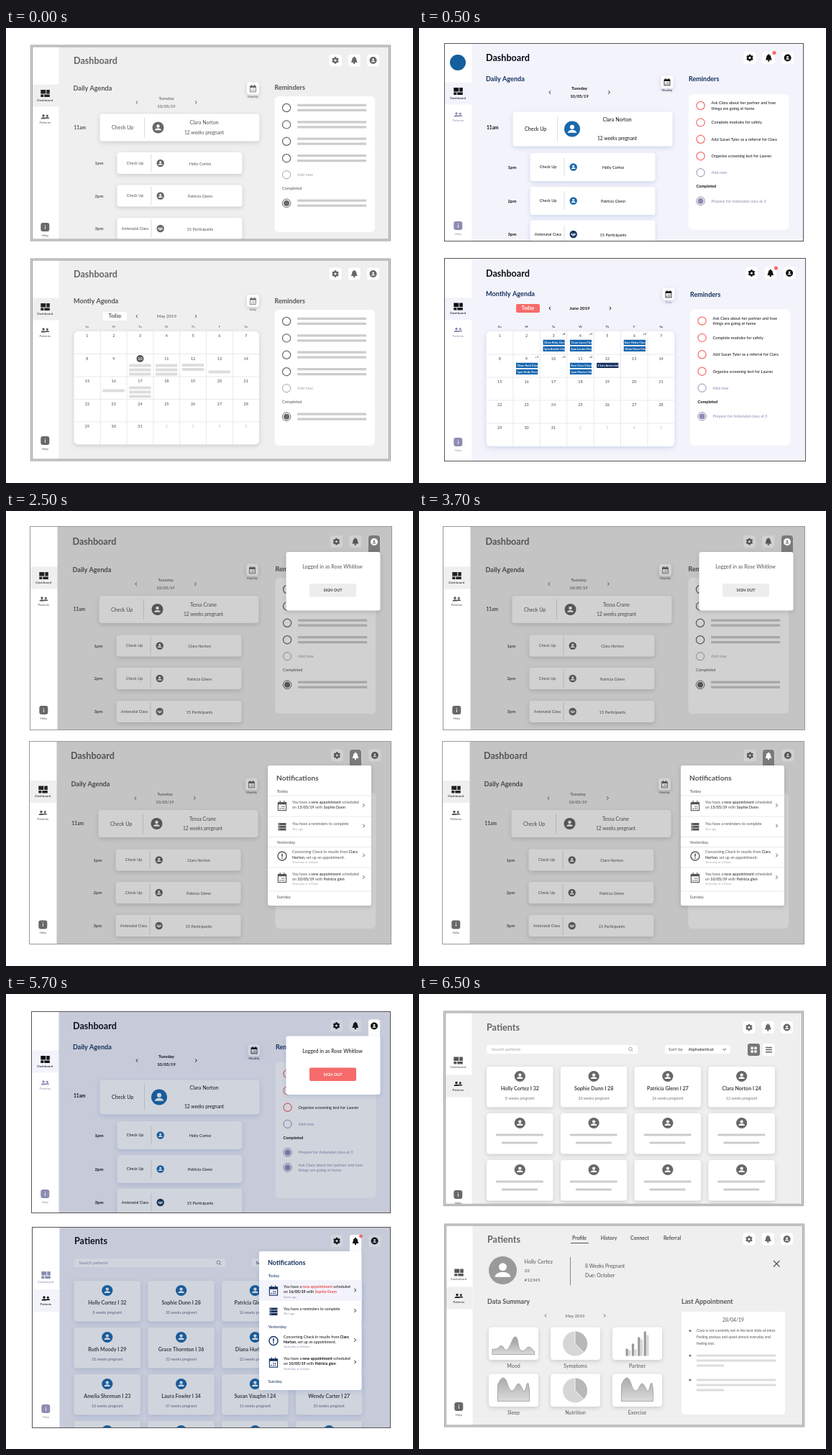
Recreate the animation shown at these times as an HTML page with a canvas. Size 566 by 633 pixels, loop 8 s.

```html
<!DOCTYPE html>
<html lang="en">
<head>
<meta charset="utf-8">
<title>Antenatal dashboard</title>
<style>
html, body { margin: 0; width: 100%; height: 100%; overflow: hidden; background: #fff; }
canvas { display: block; }
</style>
</head>
<body>
<canvas id="stage" width="566" height="633"></canvas>
<script>
const c = document.getElementById('stage').getContext('2d');

const wire = { bg: '#efefef', ink: '#555', head: '#666', title: '#555', dim: '#a5a5a5', mark: '#686868', group: '#686868',
  ring: '#666', icon: '#686868', on: '#222', off: '#555', help: '#686868', edge: '#999', shadow: 'rgba(0,0,0,.15)',
  veil: 'rgba(0,0,0,.18)', tab: '#7a7a7a', tabIcon: '#fff', button: '#ededed', buttonText: '#444', hot: '#333', list: '#555' };
const tint = { bg: '#f3f3fb', ink: '#111', head: '#0b0b14', title: '#15315f', dim: '#8c8cb2', mark: '#1a69ad', group: '#15315f',
  ring: '#f66b6b', icon: '#111', on: '#0b0b14', off: '#8c8cb2', help: '#8c8cb2', edge: '#555', shadow: 'rgba(70,110,190,.22)',
  veil: 'rgba(20,40,80,.2)', tab: '#fff', tabIcon: '#111', button: '#f66b6b', buttonText: '#fff', hot: '#f0504f', list: '#15315f' };
let th = wire;

// ---- primitives
function box(x, y, w, h, fill = '#fff', r = 0, shadow = false) {
  c.save();
  if (shadow) { c.shadowColor = th.shadow; c.shadowBlur = 6; c.shadowOffsetY = 2; }
  c.fillStyle = fill;
  c.beginPath(); c.roundRect(x, y, w, h, r); c.fill();
  c.restore();
}
function line(points, col, w = 1) {
  c.strokeStyle = col; c.lineWidth = w;
  c.beginPath(); points.forEach(p => c.lineTo(p[0], p[1])); c.stroke();
}
function dot(x, y, r, fill) { c.fillStyle = fill; c.beginPath(); c.arc(x, y, r, 0, 7); c.fill(); }
function ring(x, y, r, col, w = 1) { c.strokeStyle = col; c.lineWidth = w; c.beginPath(); c.arc(x, y, r, 0, 7); c.stroke(); }
// y is the middle of the capitals
function text(s, x, y, size, col = th.ink, bold = 0, align = 'left') {
  c.font = `${bold ? 700 : 400} ${size}px Lato, "Open Sans", sans-serif`;
  c.fillStyle = col; c.textAlign = align;
  c.fillText(s, x, y + size * .36);
}
const mid = (s, x, y, size, col, bold) => text(s, x, y, size, col, bold, 'center');
// parts between asterisks are bold, between tildes bold and highlighted
function rich(s, x, y, size) {
  s.split(/([*~][^*~]+[*~])/).forEach(part => {
    const bold = /^[*~]/.test(part), str = bold ? part.slice(1, -1) : part;
    text(str, x, y, size, part[0] === '~' ? th.hot : th.ink, bold);
    x += c.measureText(str).width;
  });
}
const chevron = (x, y, dir, s = 2.2, col = th.ink) => line([[x - dir * s / 2, y - s], [x + dir * s / 2, y], [x - dir * s / 2, y + s]], col);

// ---- icons
function person(x, y, r, col) {
  dot(x, y - r * .45, r * .5, col);
  c.beginPath(); c.ellipse(x, y + r * .85, r, r * .65, 0, Math.PI, 0); c.fill();
}
function avatar(x, y, r, col = th.mark) { dot(x, y, r, col); person(x, y, r * .56, '#fff'); }
function crowd(x, y, r, col) {
  dot(x, y, r, col);
  for (const dx of [-2.2, 2.2]) person(x + dx, y - .3, 1.5, '#fff');
  person(x, y + .6, 1.9, '#fff');
}
function gear(x, y, col) {
  for (let i = 0; i < 3; i++) {
    const a = i * Math.PI / 3 + Math.PI / 6, u = Math.cos(a) * 4.8, v = Math.sin(a) * 4.8;
    line([[x - u, y - v], [x + u, y + v]], col, 2.4);
  }
  ring(x, y, 2.6, col, 2.2); dot(x, y, 1.5, '#fff');
}
function bell(x, y, col) {
  dot(x, y - 1.2, 3, col);
  c.beginPath(); c.moveTo(x - 3, y - 1); c.lineTo(x - 4.3, y + 3); c.lineTo(x + 4.3, y + 3); c.lineTo(x + 3, y - 1); c.fill();
  dot(x, y - 4.2, 1, col); dot(x, y + 4, 1.2, col);
}
function calIcon(x, y, s, col) {
  c.strokeStyle = col; c.lineWidth = s * .2;
  c.strokeRect(x - s, y - s * .9, s * 2, s * 2);
  box(x - s, y - s, s * 2, s * .6, col);
  for (const dx of [-.5, .5]) box(x + dx * s - .5, y - s * 1.4, 1, s * .5, col);
  for (const [u, v] of [[.45, 0], [0, 0], [-.5, .5], [0, .5], [.45, .5]]) box(x + u * s - s * .12, y + v * s, s * .25, s * .25, col);
}
const headIcon = [gear, bell, (x, y, col) => { dot(x, y, 5, col); person(x, y, 2.6, col === '#fff' ? '#777' : '#fff'); }];

// ---- page parts
function screen(x, y, w, h, double, [dashY, helpY, active], body) {
  const cx = x + 18.8, patY = dashY + 32.5, tone = i => i === active ? th.on : th.off;
  c.save();
  c.beginPath(); c.rect(x, y, w, h); c.clip();
  box(x, y, w, h, th.bg);
  box(x, y, 38, h);
  box(x, (active ? patY : dashY) - 12.5, 38, 31, th.bg);
  for (const [u, v, a, b] of [[-6, -5, 7, 5.5], [2, -5, 4.5, 5.5], [-6, 1.5, 4, 3.5], [-1, 1.5, 7.5, 3.5]])
    box(cx + u, dashY + v, a, b, tone(0));
  mid('Dashboard', cx, dashY + 9.2, 4.6, tone(0));
  person(cx - 2.3, patY, 3.4, tone(1)); person(cx + 3, patY, 2.9, tone(1));
  mid('Patients', cx, patY + 8.2, 4.4, tone(1));
  box(cx - 6, helpY - 6, 12, 12, th.help, 3);
  mid('i', cx, helpY, 7, '#fff', 1);
  mid('Help', cx, helpY + 11, 4.4, th.off);
  body();
  c.restore();
  c.strokeStyle = th.edge; c.lineWidth = double ? 3 : 1;
  c.strokeRect(x, y, w, h);
  if (double) { c.strokeStyle = '#e6e6e6'; c.lineWidth = 1; c.strokeRect(x, y, w, h); }
}
function header(title, x, y, iconX, alert) {
  text(title, x, y, 12.6, th.head, 1);
  headIcon.forEach((draw, i) => {
    const ix = iconX + i * 26.3;
    box(ix - 8.5, y - 8.5, 17, 17, '#fff', 4);
    draw(ix, y, th.icon);
  });
  if (alert) dot(iconX + 34, y - 7, 2.6, '#f66b6b');
}
const veil = x => box(x, 0, 566, 633, th.veil);
function tab(i, x, y) {
  box(x - 8, y - 9, 16, 26, th.tab, [4, 4, 0, 0]);
  headIcon[i](x, y, th.tabIcon);
}
function calButton(x, y, label) {
  box(x - 8.5, y - 8.5, 17, 17, '#fff', 4, true);
  calIcon(x, y + .5, 4, th.icon);
  mid(label, x, y + 12, 4, th === tint && label === 'Daily' ? th.dim : th.ink);
}

const wireDay = { title: 84, cal: 84, date: 98, big: 138.5, bigH: 38, r: 8, gap: 7, rows: [188, 233.5, 279], rowH: 30 };
const wireDay2 = { ...wireDay, title: 82, cal: 82, date: 96, big: 137, rows: [187.5, 233, 279] };
const tintDay = { title: 71, cal: 75, date: 84, big: 140.5, bigH: 48, r: 11, gap: 13, rows: [193.5, 240.5, 287], rowH: 39 };
function daily(p, names, x = 93.5) {
  const bold = th === tint;
  text('Daily Agenda', x, p.title, 9.1, th.title, 1);
  calButton(bold ? 345 : 343.5, p.cal, 'Monthly');
  mid('Tuesday', 223, p.date, 6.1, th.ink, bold);
  mid('10/05/19', 223, p.date + 10.5, 5.8, th.ink, bold);
  chevron(182, p.date + 5.5, -1); chevron(264.3, p.date + 5.5, 1);
  text('11am', x + 1, p.big - (bold ? 2 : 0), 6.6, th.ink, 1);
  box(130.5, p.big - p.bigH / 2, 222, p.bigH, '#fff', 4, true);
  text('Check Up', 147, p.big, 7.1);
  box(192, p.big - p.bigH * .37, 1, p.bigH * .74, '#ddd');
  avatar(bold ? 213 : 211.5, p.big, p.r);
  mid(names[0], 275.5, p.big - p.gap, 7.1);
  mid('12 weeks pregnant', 275.5, p.big + p.gap, 6.6);
  p.rows.forEach((y, i) => {
    text(i + 1 + 'pm', 123.5, y, 6, th.ink, 1);
    box(154.5, y - p.rowH / 2, 174, p.rowH, '#fff', 4, true);
    mid(i < 2 ? 'Check Up' : 'Antenatal Class', 179.5, y, 5.5);
    box(201.5, y - 13, 1, 26, '#ddd');
    i < 2 ? avatar(214.7, y, 5.2) : crowd(214.7, y, 5.2, th.group);
    mid(names[i + 1] || '15 Participants', 270, y + .5, 5.6);
  });
}

const ask = ['Ask Clara about her partner and how', 'things are going at home'];
const screening = ['Organise screening test for Lauren'], prepare = ['Prepare for Antenatal class at 3'];
const todo = [ask, ['Complete modules for safety'], ['Add Susan Tyler as a referral for Clara'], screening];
const blank = [0, 0, 0, 0];
function reminders(x, y, items = blank, done = [0]) {
  const plain = th === wire, cx = x + 16.6, tx = x + 31.6;
  text('Reminders', x, y - (plain ? 12.7 : 21), 9, th.title, 1);
  box(x, y, 139.5, 189, '#fff', 6);
  const entry = (lines, cy, col) => {
    if (!lines) for (const dy of [-5.2, 1.8]) box(tx, cy + dy, 96, 3.2, '#ccc');
    else lines.forEach((s, i) => text(s, tx, cy + (i - (lines.length - 1) / 2) * 7.5, 5.55, col));
  };
  items.forEach((it, i) => {
    const cy = y + 16 + i * 23.4;
    ring(cx, cy, 5.6, th.ring, 1.2);
    entry(it, cy, th.ink);
  });
  const addY = y + 16 + items.length * 23.3;
  ring(cx, addY, 5.6, th.dim);
  text('Add new', tx, addY, 5.6, th.dim);
  text('Completed', x + 10.5, addY + 19, 5.7, th.ink, !plain);
  done.forEach((it, i) => {
    const cy = addY + 39.5 + i * 21, col = plain ? th.mark : th.dim;
    ring(cx, cy, 5.8, col); dot(cx, cy, 4, col);
    entry(it, cy, th.dim);
  });
}

function month(x, y, cw, ch, decorate) {
  ['Su', 'M', 'Tu', 'W', 'Th', 'F', 'Sa'].forEach((d, i) => mid(d, x + (i + .5) * cw, y - 7, 4.3));
  box(x, y, cw * 7, ch * 5, '#fff', 6, true);
  for (let i = 1; i < 7; i++) box(x + i * cw - .5, y, 1, ch * 5, '#e9e9ee');
  for (let i = 1; i < 5; i++) box(x, y + i * ch - .5, cw * 7, 1, '#e9e9ee');
  const at = day => [x + (day - 1) % 7 * cw, y + Math.floor((day - 1) / 7) * ch];
  for (let day = 1; day < 36; day++) {
    const [u, v] = at(day), now = th === wire && day === 10;
    if (now) dot(u + cw / 2, v + 6.5, 5, '#555');
    mid(day < 32 ? day : day - 30, u + cw / 2, v + 6.5, 5.4, now ? '#fff' : day < 32 ? '#444' : '#bbb', now);
  }
  decorate(at);
}
function monthBar(y, label, next) {
  box(135, y - 6, 33, 12, th === wire ? '#fff' : th.button, 2);
  mid('Today', 151.5, y, 6.6, th === wire ? th.ink : '#fff', 1);
  chevron(182, y, -1); chevron(next, y, 1);
  mid(label, 223.5, y, 6.1, th.ink, th === tint);
}

function account(x, y) {
  box(x, y, 131, 81.5, '#fff', 3, true);
  mid('Logged in as Rose Whitlow', x + 64.5, y + 20.5, 7.1);
  box(x + 32.5, y + 44, 65, 18.5, th.button, 2);
  mid('SIGN OUT', x + 65, y + 53.5, 5.5, th.buttonText, 1);
}
function notifications(x, y, w, top, h) {
  const plain = th === wire;
  box(x, top, w, h, '#fff', 3, true);
  text('Notifications', x + 12, y + 16, plain ? 10.2 : 9.1, th.title, 1);
  const days = [['Today', 34], ['Yesterday', 105], ['Sunday', 181]];
  days.forEach(([s, dy]) => text(s, x + 12.5, y + dy, 6, th.title));
  if (plain) [40, 69, 97.5, 111.5, 140, 173].forEach(dy => box(x, y + dy, w, 1, '#e9e9e9'));
  else box(x, y + 40, w, 29, th.bg);
  const q = plain ? '*' : '~';
  [[49.5, 'date', [`You have a ${q}new appointment${q} scheduled`, `on *${plain ? 15 : 16}/05/19* with ${q}Sophie Dunn${q}`], plain ? '' : '2mins ago'],
   [80, 'list', ['You have a reminders to complete'], '3hrs ago'],
   [119, 'alert', ['Concerning Check In results from *Clara*', '*Norton*, set up an appointment.'], 'Yesterday at 4:45pm'],
   [149.5, 'date', ['You have a *new appointment* scheduled', 'on *10/05/19* with *Patricia glen*'], 'Yesterday at 2:25pm'],
  ].forEach(([dy, kind, lines, note]) => {
    const iy = y + dy + (kind === 'list' ? 3.5 : 5.5), ix = x + 20;
    if (kind === 'date') calIcon(ix, iy, 5.6, th.list);
    if (kind === 'list') for (const k of [-5, -1.3, 2.4]) { box(ix - 5.5, iy + k, 11, 3, th.list); box(ix - 4.5, iy + k + 1, 1, 1); }
    if (kind === 'alert') { ring(ix, iy, 6, th.list, 1.4); box(ix - .8, iy - 3.5, 1.6, 4.5, th.list); box(ix - .8, iy + 2, 1.6, 1.6, th.list); }
    lines.forEach((s, i) => rich(s, x + 34, y + dy + i * (plain ? 7.3 : 6.7), 5.3));
    text(note, x + 34, y + dy + lines.length * 6.8, 4, th.dim);
    chevron(x + 133.5, iy - 1, 1, 2.3);
  });
}

function search(x, y, w) {
  box(x, y - 6, w, 12, '#fff', 3);
  text('Search patients', x + 7, y, 6, th.dim);
  ring(x + w - 10, y - .5, 2.3, th.dim); line([[x + w - 8.4, y + 1.2], [x + w - 6.5, y + 3]], th.dim);
}
function patient(x, y, name, weeks) {
  box(x, y, 92.5, 56.5, '#fff', 4, true);
  avatar(x + 46.3, y + 13.5, 7.6);
  if (name) {
    mid(name, x + 46.3, y + 30, 7.1, '#444', 1);
    mid(weeks + ' weeks pregnant', x + 46.3, y + 44, 5.2, th === tint ? '#666c88' : '#777');
  } else {
    box(x + 13, y + 28.5, 66, 3, '#ccc', 1);
    box(x + 21, y + 39.5, 50, 3, '#ccc', 1);
  }
}
const firstRow = [['Holly Cortez I 32', 8], ['Sophie Dunn I 28', 20], ['Patricia Glenn I 27', 26], ['Clara Norton I 24', 12]];
function patients(x, y, list) {
  list.forEach((p, i) => patient(x + i % 4 * 102.8, y + Math.floor(i / 4) * 65, p[0], p[1]));
}

// ---- charts
function area(points, base) {
  const last = points[points.length - 1], g = c.createLinearGradient(0, points[0][1] - 10, 0, base);
  g.addColorStop(0, '#aaa'); g.addColorStop(1, '#dcdcdc');
  c.beginPath(); c.moveTo(points[0][0], base); c.lineTo(...points[0]);
  for (let i = 1; i < points.length - 1; i++) {
    const [a, b] = points[i], [p, q] = points[i + 1];
    c.quadraticCurveTo(a, b, (a + p) / 2, (b + q) / 2);
  }
  c.lineTo(...last); c.lineTo(last[0], base); c.closePath();
  c.fillStyle = g; c.fill();
  c.strokeStyle = '#999'; c.lineWidth = .8; c.stroke();
}
const hills = x => area([[0, 544], [4, 534], [11, 534], [16, 551], [22, 553], [28, 540], [33, 546], [37, 556], [42, 537], [44, 551]]
  .map(([u, v]) => [x + u, v]), 566.5);
function pie(x, y) {
  dot(x, y, 17, '#d6d6d6');
  c.fillStyle = '#b8b8b8';
  c.beginPath(); c.moveTo(x, y); c.arc(x, y, 17, -Math.PI / 2, Math.PI / 4); c.fill();
  line([[x, y - 17], [x, y], [x + 12, y + 12]], '#fff', .8);
}

// ---- scenes
function shifted(dx, dy, draw) { c.save(); c.translate(dx, dy); draw(); c.restore(); }

function wireDashboards() {
  th = wire;
  screen(35.5, 25, 498, 270, true, [91, 277, 0], () => {
    header('Dashboard', 94, 45, 458);
    daily(wireDay, ['Clara Norton', 'Holly Cortez', 'Patricia Glenn']);
    reminders(373.5, 95);
  });
  screen(35.5, 322, 498, 279, true, [388, 574, 0], () => {
    header('Dashboard', 94, 342, 458);
    text('Montly Agenda', 94, 380, 9.1, th.title, 1);
    calButton(343.5, 379.5, 'Daily');
    monthBar(401, 'May 2019', 264);
    month(94.5, 422, 36.8, 31.5, at => {
      for (const [day, n, dy] of [[10, 3, 14], [11, 3, 14], [12, 2, 13.5], [13, 1, 23], [16, 1, 17.5], [17, 3, 13.5]]) {
        const [u, v] = at(day);
        for (let i = 0; i < n; i++) box(u + 3, v + dy + i * 6, 30.5, 4, '#ddd');
      }
    });
    reminders(373.5, 392);
  });
}

function tintDashboards() {
  th = tint;
  screen(35.5, 21.5, 499, 275, false, [88, 275, 0], () => {
    dot(54, 48, 11, '#145f9e');
    header('Dashboard', 93, 41.5, 460, true);
    daily(tintDay, ['Clara Norton', 'Holly Cortez', 'Patricia Glenn'], 93);
    reminders(375, 92, todo, [prepare]);
  });
  screen(35.5, 320.5, 502, 282, false, [387.5, 576, 0], () => {
    header('Dashboard', 93, 341, 462.5, true);
    text('Monthly Agenda', 93, 370, 9.2, th.title, 1);
    calButton(347, 370, 'Daily');
    monthBar(390, 'June 2019', 266);
    month(93.5, 422, 37.4, 32, at => {
      for (const [day, more, ...events] of [[3, 4, '10am Kitty Check', '1pm Amelia Check'], [4, 3, '11am Laura Check', '1pm Louise Check'],
        [6, 2, '8am Helen Check', '10am Grace Check'], [9, 1, '10am Ruth Check', '1pm Holly Check'], [10, 3],
        [11, 2, '8am Clara Check', '1pm Monica Check'], [12, 0, '11am Antenatal Class']]) {
        const [u, v] = at(day);
        if (more) mid('+' + more, u + 33, v + 3.5, 4);
        events.forEach((s, i) => {
          const y = v + 11.5 + i * 9;
          c.save();
          c.beginPath(); c.rect(u + 4, y, 30.5, 7.6); c.clip();
          box(u + 4, y, 30.5, 7.6, day === 12 ? '#15315f' : '#1665ae');
          text(s, u + 5.5, y + 3.8, 4, '#fff', 1);
          c.restore();
        });
      }
    });
    reminders(377, 391.5, todo, [prepare]);
  });
}

function wirePopups() {
  th = wire;
  const names = ['Tessa Crane', 'Clara Norton', 'Patricia Glenn'];
  screen(33.5, 21.5, 503, 283, false, [90, 277, 0], () => {
    header('Dashboard', 92.5, 42.5, 459.5);
    shifted(-1, 0, () => daily(wireDay2, names));
    reminders(374.5, 93);
    veil(71.5);
    tab(2, 512, 43);
    account(389.5, 57);
  });
  screen(32.5, 320.5, 503, 282, false, [387.5, 575.5, 0], () => {
    header('Dashboard', 90, 340, 460.3);
    shifted(-2, 298, () => daily(wireDay2, names, 92.5));
    reminders(374.5, 392);
    veil(70.5);
    tab(1, 486, 341);
    notifications(364, 355.5, 144, 354, 195);
  });
}

function tintPopups() {
  th = tint;
  screen(35.5, 24.5, 499, 280, false, [91, 278, 0], () => {
    header('Dashboard', 93, 44, 459.5);
    shifted(0, 3, () => daily(tintDay, ['Clara Norton', 'Holly Cortez', 'Patricia Glenn'], 93));
    reminders(375, 95, [todo[1], todo[2], screening], [prepare, ask]);
    veil(73.5);
    tab(2, 512, 44.5);
    account(389.5, 58.5);
  });
  screen(36.5, 324.5, 498, 279, false, [391, 577, 1], () => {
    header('Patients', 95, 343.5, 460);
    search(94.5, 374, 211);
    box(342, 368, 90, 12, '#fff', 3);
    text('Sort by', 347.5, 374, 6);
    patients(94.5, 399, [...firstRow,
      ['Ruth Moody I 29', 18], ['Grace Thornton I 36', 32], ['Diana Hurley I 31', 22], ['Helen Marsh I 30', 14],
      ['Amelia Sherman I 23', 10], ['Laura Fowler I 34', 37], ['Susan Vaughn I 24', 15], ['Wendy Carter I 27', 20],
      [' ', ''], [' ', ''], [' ', ''], [' ', '']]);
    veil(74.5);
    tab(1, 486, 344);
    dot(493.5, 337, 2.4, '#f66b6b');
    notifications(352, 358, 142.5, 358, 193);
  });
}

function wirePatients() {
  th = wire;
  screen(35.5, 25, 498, 268.5, true, [92.5, 279, 1], () => {
    header('Patients', 94, 46.5, 459);
    search(94, 77, 210);
    box(342, 71, 90.5, 12, '#fff', 3);
    text('Sort by', 347, 77, 6.3);
    text('Alphabetical', 374.5, 77, 6.3, th.ink, 1);
    line([[422.5, 76], [424.7, 78.2], [427, 76]], th.ink);
    box(457, 69, 17, 17, '#777', 3);
    for (const dx of [-4, .8]) for (const dy of [-4, .8]) box(465.5 + dx, 77.5 + dy, 3.4, 3.4);
    box(478, 69, 16.5, 17, '#fff', 3);
    for (const dy of [-3.8, -.7, 2.4]) box(482, 77.5 + dy, 9, 1.5, '#666');
    patients(94, 101, [...firstRow, ...Array(8).fill([])]);
  });
  screen(36.5, 321, 498, 280, true, [387.5, 574, 1], () => {
    header('Patients', 95, 341, 459);
    [['Profile', 223], ['History', 264], ['Connect', 307], ['Referral', 352]].forEach(([s, x]) => mid(s, x, 340, 6.9, th.ink, 1));
    box(211, 346, 25, 1, '#555');
    avatar(116.5, 384.5, 19.5, '#9a9a9a');
    text('Holly Cortez', 146.5, 372, 7.2); text('32', 146.5, 385, 6.4); text('#12345', 146.5, 398, 6.3);
    box(210, 366, 1, 39, '#888');
    text('8 Weeks Pregnant', 231, 378.5, 6.9); text('Due: October', 231, 392, 6.9);
    line([[493, 371], [501.5, 379.5]], '#555', 1.2); line([[501.5, 371], [493, 379.5]], '#555', 1.2);
    text('Data Summary', 95, 427.5, 9, th.title, 1);
    chevron(176, 447.5, -1, 2); chevron(258, 447.5, 1, 2);
    mid('May 2019', 217, 448, 6);
    ['Mood', 'Symptoms', 'Partner', 'Sleep', 'Nutrition', 'Exercise'].forEach((s, i) => {
      const x = 97 + i % 3 * 86, y = 463.5 + Math.floor(i / 3) * 65;
      box(x, y, 69, 45.5, '#fff', 4, true);
      mid(s, x + 34.5, y + 53.5, 7.1);
    });
    area([[102, 494], [108, 495], [115, 487], [121, 498], [127, 489], [132, 476], [137, 478], [139, 495], [146, 498], [152, 489], [160.5, 497]], 501.5);
    pie(217, 486.5); pie(217, 551.5);
    [10, 8, 17, 9, 26, 23, 34, 29].forEach((h, i) => box(287.5 + Math.floor(i / 2) * 8.4 + i % 2 * 3.6, 503.5 - h, 3.2, h, i % 2 ? '#d6d6d6' : '#999'));
    hills(109.5); hills(281.5);
    text('Last Appointment', 365, 427.5, 9, th.title, 1);
    box(365, 442, 144, 143, '#fff', 4);
    mid('28/04/19', 437, 454, 6.9);
    [468.5, 503, 537].forEach(y => dot(377, y, 1.6, '#777'));
    ['Clara is not currently not in the best state of mind.', 'Feeling anxious and upset almost everyday and', 'feeling lost.']
      .forEach((s, i) => text(s, 386, 468.5 + i * 9, 5));
    for (const y of [503, 537]) [110, 110, 38].forEach((w, i) => box(386, y - 1.5 + i * 7, w, 3, '#dcdcdc'));
  });
}

// ---- playback
const cuts = [[0, wireDashboards], [500, tintDashboards], [2500, wirePopups], [4500, tintPopups], [6500, wirePatients]];
let shown;
function tick() {
  const t = performance.now() % 8000, scene = cuts.filter(cut => cut[0] <= t).pop()[1];
  if (scene !== shown) {
    shown = scene;
    box(0, 0, 566, 633);
    scene();
  }
  requestAnimationFrame(tick);
}
tick();
</script>
</body>
</html>
```
